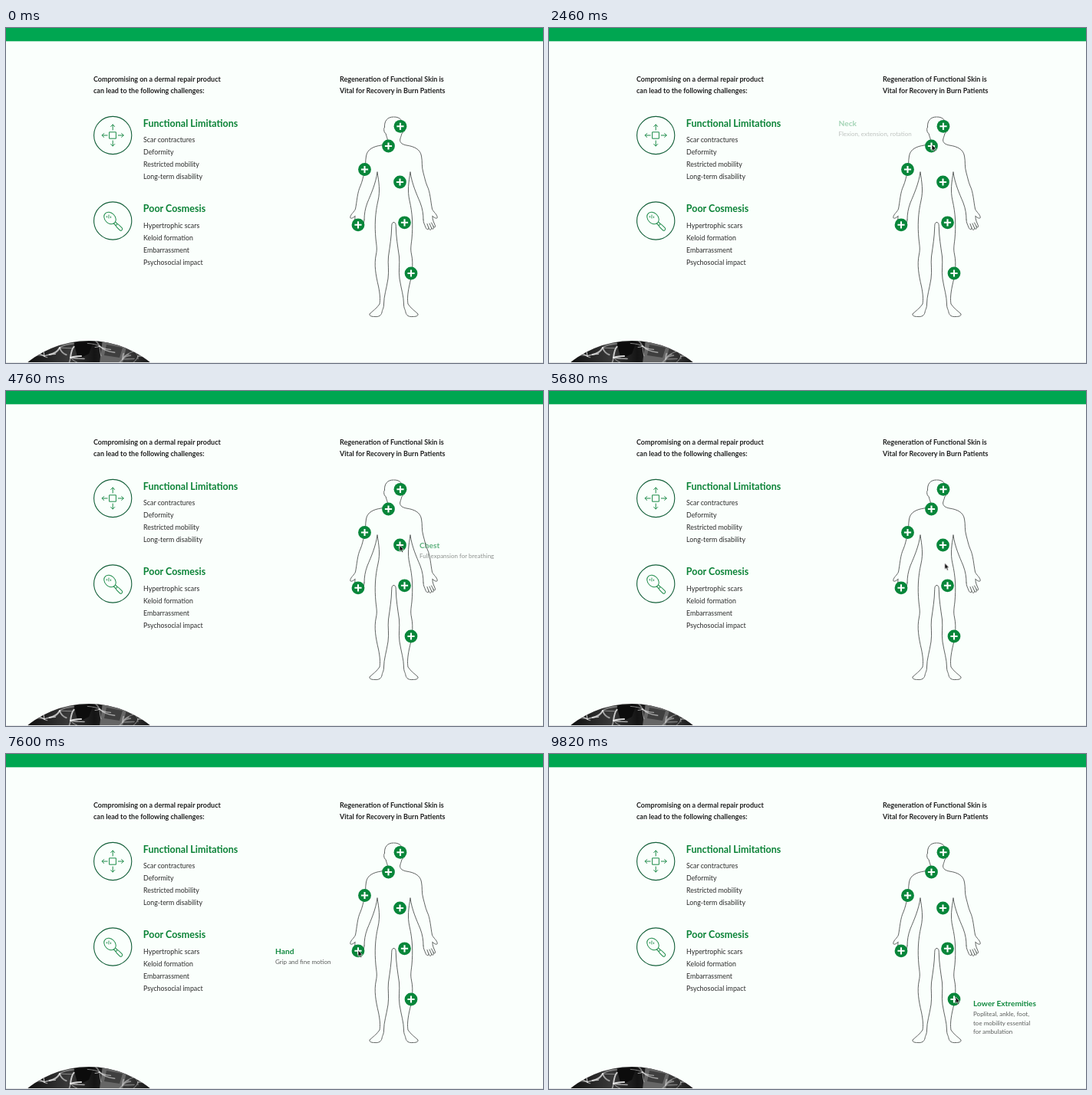
These frames come from a looping animation (700x437 px, 9840 ms). An HTML page:

```html
<!DOCTYPE html>
<html lang="en">
<head>
<meta charset="utf-8">
<title>Dermal repair challenges</title>
<style>
  html, body { margin: 0; width: 100%; height: 100%; overflow: hidden; background: #fafffc; }
  svg { display: block; width: 700px; height: 437px; font-family: Lato, "Open Sans", sans-serif; }
  .title { font-size: 9px; font-weight: 700; fill: #202020; }
  .head { font-size: 12.5px; font-weight: 700; fill: #0a8236; }
  .item { font-size: 8.85px; fill: #2c2c2c; }
  .name { font-size: 10.2px; font-weight: 700; fill: #128a40; }
  .note { font-size: 8px; fill: #5a5c5b; }
  .icon { fill: none; stroke: #1c8a48; stroke-linecap: round; stroke-linejoin: round; }
  .ring { stroke: #14603a; stroke-width: 1.1; }
  .body { fill: none; stroke: #505352; stroke-width: .9; stroke-linejoin: round; stroke-linecap: round; }
  .label { opacity: 0; }
</style>
</head>
<body>
<svg id="stage" viewBox="0 0 700 437">
  <defs>
    <clipPath id="disc"><circle cx="108" cy="535.6" r="127.6"/></clipPath>
    <linearGradient id="tissue">
      <stop offset=".1" stop-color="#0c0c0c"/>
      <stop offset=".34" stop-color="#3a3a3a"/>
      <stop offset=".48" stop-color="#141414"/>
      <stop offset=".66" stop-color="#3c3c3c"/>
      <stop offset=".8" stop-color="#111"/>
    </linearGradient>
    <path id="side" d="M505 116 C497 116 493 121 493.5 130 C492 130 492.5 137 495 137.5
      C496 142 497 143 497.400 146 C497.500 150 494 152 489 153 C479 154.500 471 158 469.500 167
      C468 174 469.500 181 467 189 C465 196 464.500 200 462 206 C458 214 457.500 226 455.500 236
      C454 240 449 243 448.800 247 C449 249.500 452 248 455 245.500
      M484 188 C482 203 476 216 471 228 C468 236 467 243 467 250
      M484 188 C486 201 488 212 485 225 C481 242 480.500 258 482 275
      C483 284 484 288 482.500 295 C479.500 309 482 322 485.500 337 C487.500 347 488 354 487 360
      C484 365 477 370 474 373 C473.500 376 477 376.500 481 376.500 C486 377 489 375 490 371
      C490.500 367 492.500 366 492.500 360 C492.500 350 496 340 498 327 C499.500 316 497.500 308 498.500 298
      C500.500 284 502.500 272 502.700 260 C502.700 255 503.500 253.500 505.500 253.500"/>
    <path id="hand" d="M455 245.500 C455.500 250 453 254 451.500 258 C451 260.500 453 260.500 454 258.500
      L456.500 254 M454 258.500 C453 263 455 263.500 456.500 260.500 L459 255
      M456.500 260.500 C456 264.500 459 264 460 261 L462 255.500
      M460 261 C460 264 463 263 464 260 C465.500 256 467 254 467 250"/>
  </defs>

  <rect width="700" height="437" fill="#fafffc"/>
  <rect width="700" height="17.300" fill="#00a651"/>

  <g clip-path="url(#disc)">
    <rect y="405" width="240" height="32" fill="url(#tissue)"/>
    <path d="M126 406 L158 412 L152 437 L122 437Z" fill="#666"/>
    <path d="M131 413 L152 417 L148 430 L128 427Z" fill="#3f3f3f"/>
    <path d="M88 410 L114 409 L108 425 L94 432Z" fill="#0c0c0c"/>
    <g id="webs" fill="none" stroke-linecap="round"></g>
  </g>
  <rect y="436" width="700" height="1" fill="#e3e5e6"/>

  <g class="icon">
    <circle class="ring" cx="139.2" cy="140" r="24.6"/>
    <rect x="135" y="135.800" width="8.400" height="8.400"/>
    <path id="arrow" d="M139.200 133 V126 M136.700 128.500 L139.200 126 L141.700 128.500"/>
    <circle class="ring" cx="139.2" cy="251.5" r="24.6"/>
    <g transform="translate(135.500 248) rotate(-45)">
      <ellipse rx="6.700" ry="8.600"/>
      <path d="M-1.500 8.500 L-1.500 12 M1.500 8.500 L1.500 12"/>
      <rect x="-2" y="12" width="4" height="10" rx="2"/>
    </g>
    <path d="M131.500 245.500 V247 M134 244 V248 M136.500 246 V247.500" stroke-width=".9"/>
  </g>

  <g id="copy"></g>

  <g class="body">
    <use href="#side"/><use href="#hand"/>
    <g transform="translate(1011 0) scale(-1 1)"><use href="#side"/><use href="#hand"/></g>
  </g>
  <g id="spots"></g>
  <path id="cursor" d="M0 0 V8.200 L1.900 6.500 L3.300 9.600 L4.700 9 L3.300 6 H5.700Z"
    fill="#111" stroke="#fff" stroke-width=".6" stroke-linejoin="round"/>
</svg>

<script>
const LOOP = 9840, FADE_IN = 300, FADE_OUT = 220;
const $ = id => document.getElementById(id);

function add(parent, tag, attrs, text) {
  const el = document.createElementNS('http://www.w3.org/2000/svg', tag);
  for (const key in attrs) el.setAttribute(key, attrs[key]);
  if (text) el.textContent = text;
  return parent.appendChild(el);
}
function lines(parent, cls, x, y, step, rows) {
  rows.forEach((row, i) => add(parent, 'text', { class: cls, x, y: y + i * step }, row));
}
function play(el, frames) {
  const keys = frames.map(({ at, ...rest }) => ({ offset: at / LOOP, ...rest }));
  el.animate(keys, { duration: LOOP, iterations: Infinity }).startTime = 0;
}

const copy = $('copy');
lines(copy, 'title', 114, 70.2, 15, ['Compromising on a dermal repair product', 'can lead to the following challenges:']);
lines(copy, 'title', 435, 70.2, 15, ['Regeneration of Functional Skin is', 'Vital for Recovery in Burn Patients']);
lines(copy, 'head', 178.8, 128.6, 0, ['Functional Limitations']);
lines(copy, 'item', 179, 149.3, 16, ['Scar contractures', 'Deformity', 'Restricted mobility', 'Long-term disability']);
lines(copy, 'head', 178.8, 240.2, 0, ['Poor Cosmesis']);
lines(copy, 'item', 179, 260.8, 16, ['Hypertrophic scars', 'Keloid formation', 'Embarrassment', 'Psychosocial impact']);

for (const turn of [90, 180, 270]) {
  const arm = $('arrow').cloneNode();
  arm.removeAttribute('id');
  arm.setAttribute('transform', `rotate(${turn} 139.2 140)`);
  $('arrow').after(arm);
}

// Seeded fibres branching from bright knots in the tissue picture
let seed = 11;
const rand = () => (seed = seed * 16807 % 2147483647) / 2147483647;
for (const [x, y] of [[50, 428], [70, 417], [84, 430], [122, 415], [152, 432], [172, 428]]) {
  for (let i = 0; i < 6; i++) {
    const dx = (rand() - .5) * 40, dy = (rand() - .5) * 30;
    add($('webs'), 'path', {
      d: `M${x} ${y} q${dx * .3} ${dy * .8} ${dx} ${dy}`,
      stroke: x < 130 ? '#eee' : '#bbb',
      'stroke-width': .5 + rand() * 1.5,
      opacity: .4 + rand() * .5
    });
  }
}

// Marker centre, label place, cursor tip, arrive/leave times, label shown/hidden times
const spots = [
  { at: [514, 128.3], text: [539, 130], tip: [514, 128], stay: [680, 2100], show: [560, 2110],
    name: 'Face', note: ['Facial expression, speech'] },
  { at: [498.5, 154], text: [377.5, 128], tip: [499, 152], stay: [2450, 3250], show: [2350, 3320],
    name: 'Neck', note: ['Flexion, extension, rotation'] },
  { at: [467.5, 184.5], text: [355, 193.3], tip: [465, 184], stay: [3720, 4120], show: [3600, 4180],
    name: 'Axilla', note: ['Complete mobility of arms'] },
  { at: [513.5, 201], text: [539, 205], tip: [513, 201], stay: [4650, 5400], show: [4560, 5450],
    name: 'Chest', note: ['Full expansion for breathing'] },
  { at: [519.5, 253.8], text: [545, 258], tip: [519, 252], stay: [5990, 6500], show: [5860, 6570],
    name: 'Groin', note: ['Hip flexion, walking'] },
  { at: [459, 256.8], text: [351, 261], tip: [459, 256], stay: [7113, 8060], show: [7010, 8120],
    name: 'Hand', note: ['Grip and fine motion'] },
  { at: [528, 320], text: [553, 329.2], tip: [530, 317], stay: [8660, LOOP], show: [8560, LOOP],
    name: 'Lower Extremities', note: ['Popliteal, ankle, foot,', 'toe mobility essential', 'for ambulation'] }
];

const pos = ([x, y]) => `translate(${x}px, ${y}px)`;
const easing = 'ease-in-out';
const path = [
  { at: 0, transform: pos([710, 190]) },
  { at: 180, transform: pos([710, 190]), easing }
];

for (const { at: [x, y], text: [tx, ty], tip, stay, show: [on, off], name, note } of spots) {
  add($('spots'), 'circle', { cx: x, cy: y, r: 8.4, fill: '#07863a' });
  add($('spots'), 'path', { d: `M${x - 4.6} ${y} h9.2 M${x} ${y - 4.6} v9.2`, stroke: '#fff', 'stroke-width': 2.1 });

  const label = add(copy, 'g', { class: 'label' });
  lines(label, 'name', tx, ty, 0, [name]);
  lines(label, 'note', tx, ty + 13.2, 11.5, note);
  const fade = [
    { at: 0, opacity: 0 }, { at: on, opacity: 0 },
    { at: on + FADE_IN, opacity: 1 }, { at: off, opacity: 1 }
  ];
  if (off < LOOP) fade.push({ at: off + FADE_OUT, opacity: 0 }, { at: LOOP, opacity: 0 });
  play(label, fade);

  path.push({ at: stay[0], transform: pos(tip) }, { at: stay[1], transform: pos(tip), easing });
}
play($('cursor'), path);
</script>
</body>
</html>
```
